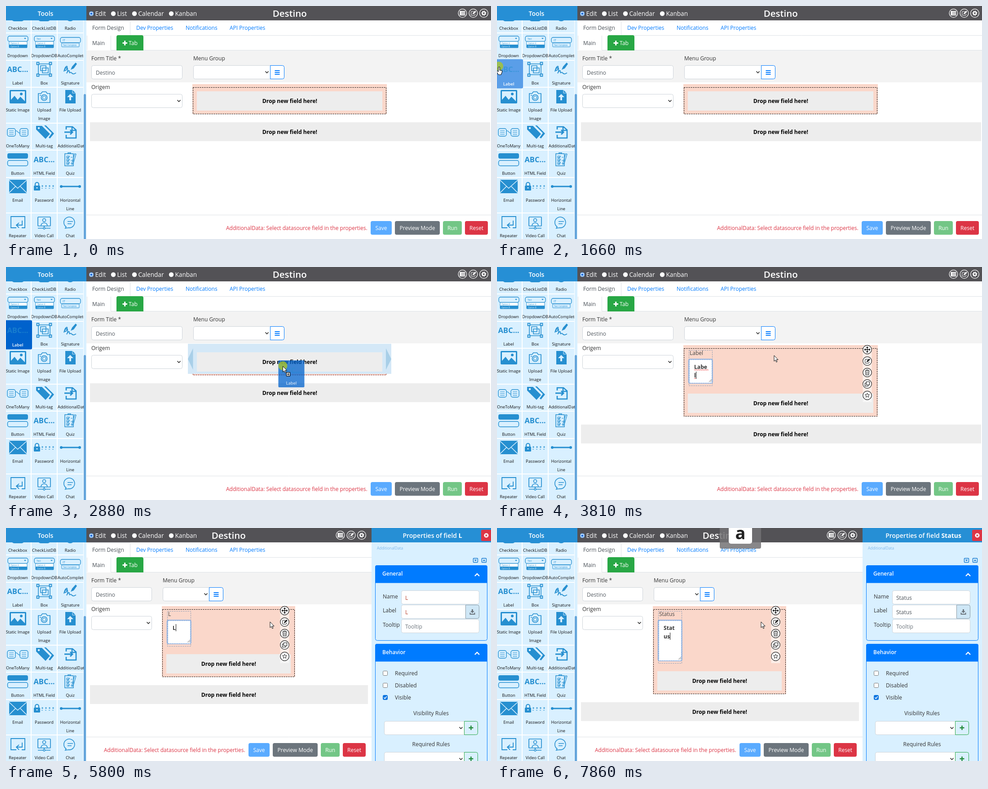
Recreate the animation shown at these times as an HTML page with a canvas. Size 1080 by 519 pixels, loop 7.99 s.

```html
<!DOCTYPE html>
<html lang="en">
<head>
<meta charset="utf-8">
<title>Form designer</title>
<style>
html, body { margin: 0; width: 100%; height: 100%; overflow: hidden; background: #fff; }
canvas { display: block; }
</style>
</head>
<body>
<canvas id="stage" width="1080" height="519"></canvas>
<script>
const c = document.getElementById('stage').getContext('2d');
const LOOP = 7990, STEP = 200 / 3;
const BLUE = '#268fd0', PALE = '#d9f0ff', PRIMARY = '#007bff', INK = '#333', LINE = '#dee2e6';
const PINK = '#fad7ca', GREY = '#ededed', GREEN = '#28a745', RED = '#dc3545';

// time, label text, extra height of the text area
const edits = [
  [3810, 'Label', 1], [5340, 'Labe', 0], [5400, 'Labe', 19], [5470, 'Lab', 19],
  [5670, 'La', 19], [5740, 'L', 19], [5800, 'L', 0], [6000, '', -1],
  [6800, 'S', 0], [7260, 'St', 0], [7330, 'Sta', 0], [7400, 'Sta', 19],
  [7590, 'Stat', 19], [7660, 'Statu', 19], [7790, 'Status', 19], [7860, 'Status', 38]
];

const mix = (a, b, p) => a + (b - a) * p;
const clamp = v => Math.max(0, Math.min(1, v));
const ease = v => { v = clamp(v); return v * v * (3 - 2 * v); };
const span = (t, a, b) => ease((t - a) / (b - a));

function text(s, x, y, color = INK, size = 12, weight = 400, align = 'left') {
  c.font = `${weight} ${size}px "Open Sans", sans-serif`;
  c.textAlign = align;
  c.fillStyle = color;
  c.fillText(s, x, y);
}
function rect(x, y, w, h, color) { c.fillStyle = color; c.fillRect(x, y, w, h); }
function box(x, y, w, h, r, fillColor, edge, width = 1) {
  c.beginPath();
  c.roundRect(x, y, w, h, r);
  if (fillColor) { c.fillStyle = fillColor; c.fill(); }
  if (edge) { c.strokeStyle = edge; c.lineWidth = width; c.stroke(); }
}
function disc(x, y, r, fillColor, edge, width = 1) { box(x - r, y - r, 2 * r, 2 * r, r, fillColor, edge, width); }
function fill(d, color) { c.fillStyle = color; c.fill(new Path2D(d)); }
function line(d, color = BLUE, width = 1.5) {
  c.strokeStyle = color;
  c.lineWidth = width;
  c.stroke(new Path2D(d));
}
function at(x, y, draw, alpha = 1) {
  c.save();
  c.translate(x, y);
  c.globalAlpha *= alpha;
  draw();
  c.restore();
}
function dashed(x, y, w, h, color, pattern = [3, 2]) {
  c.save();
  c.setLineDash(pattern);
  box(x, y, w, h, 0, null, color);
  c.restore();
}

// ---- sidebar icons, drawn around their own centre
const star = n => Array.from({ length: 2 * n }, (_, i) => {
  const a = i * Math.PI / n - Math.PI / 2, r = i % 2 ? 2.3 : 5.2;
  return `${i ? 'L' : 'M'}${r * Math.cos(a)} ${r * Math.sin(a)}`;
}).join('') + 'Z';

function dropdown(caption) {
  box(-22, -13, 45, 12, 4, null, BLUE, 1.3);
  fill('M14 -9h5l-2.5 3z', BLUE);
  text(caption, -17, -5, BLUE, 5);
  box(-19, -1, 40, 14, 1, '#fff', BLUE);
  rect(-19, 6, 40, 7, BLUE);
  text('Option A', -16, 5, BLUE, 4.5);
  text('Option B', -16, 11.5, PALE, 4.5);
}
function abc() { text('ABC...', 0, 6, BLUE, 16.5, 700, 'center'); }
function pencil(s = 1, color = BLUE) {
  c.save();
  c.scale(s, s);
  line('M2 -5H-4Q-6 -5 -6 -3V4Q-6 6 -4 6H3Q5 6 5 4V2', color, 1.3);
  fill('M-2 3L-1 -1L5 -7L8 -4L2 2Z', color);
  c.restore();
}

const icons = {
  Checkbox() { box(-13, -2, 27, 10, 5, BLUE); },
  CheckListDB() { box(-13, -2, 26, 10, 5, BLUE); },
  Radio() { disc(0, -2, 10, BLUE); },
  Dropdown() { dropdown(''); },
  DropdownDB() { dropdown('Text'); },
  AutoComplete() {
    box(-22, -10, 45, 12, 4, null, BLUE, 1.3);
    text('IT', -17, -1, BLUE, 7);
    box(-19, 2, 39, 9, 1, null, BLUE);
    text('Text Complete', -16, 8.5, BLUE, 4.5);
  },
  Label: abc,
  Box() {
    line('M-13 -12H13V12H-13ZM-8 -8H4V3H-8ZM-4 -3H9V8H-4Z', BLUE, 1.6);
    for (const x of [-14, 14]) for (const y of [-13, 13]) box(x - 2.5, y - 2.5, 5, 5, 0, PALE, BLUE, 1.8);
  },
  Signature() {
    line('M-14 5C-11 -9 -5 -9 -7 -3C-9 5 -15 4 -11 -2C-4 -9 -5 5 -8 9C-5 3 -1 0 -2 7C0 10 0 4 3 8C7 12 9 10 13 8', BLUE, 1.8);
    fill('M1 1L4 -6L12 -15L15 -12L8 -2Z', BLUE);
  },
  'Static Image'() {
    box(-18, -15, 37, 30, 2, BLUE);
    rect(-15, -12, 31, 24, PALE);
    fill('M-15 12V7L-7 -2L0 7L6 0L16 10V12Z', BLUE);
    disc(8, -6, 3, BLUE);
  },
  'Upload Image'() {
    line('M-13 -7H-7L-4 -11H4L7 -7H13V13H-13Z', BLUE, 1.7);
    disc(0, 2, 6.5, null, BLUE, 1.7);
    disc(0, 2, 3.5, null, BLUE, 1.2);
    line('M-10 -3h3', BLUE);
  },
  'File Upload'() {
    fill('M-11 -15H5L12 -8V15H-11Z', BLUE);
    fill('M0 -6L7 1H2V8H-2V1H-7Z', PALE);
    line('M5 -15V-8H12', PALE, 1);
  },
  OneToMany() {
    for (const x of [-23, 5]) {
      box(x, -8, 18, 17, 4, null, BLUE, 1.4);
      line(`M${x + 4} -3h10m-10 4h10m-10 4h10`, BLUE, 1);
    }
    line('M-5 -3C1 -4 0 3 5 2', BLUE, 1.3);
  },
  'Multi-tag'() {
    fill('M-10 -15H0L17 2L10 12L13 14L22 3L4 -15Z', BLUE);
    fill('M-18 -14H-5L13 4L3 15L-18 -6Z', BLUE);
    disc(-12, -9, 2.3, PALE);
  },
  AdditionalData() {
    line('M-9 -6V-12H5L13 -5V13H-9V6M4 -12V-4H13', BLUE, 2.6);
    line('M-13 0H4M0 -5L5 0L0 5', BLUE, 3);
  },
  Button() {
    box(-23, -14, 46, 12, 4, BLUE);
    box(-22.5, 2, 45, 12, 4, PALE, BLUE, 1.5);
  },
  'HTML Field': abc,
  Quiz() {
    line('M-12 -13H7V14H-12ZM-5 -13V-15H1V-13', BLUE, 1.5);
    for (const y of [-8, -1, 6]) {
      box(-8, y, 5, 5, 0, null, BLUE, 1);
      line(`M-7 ${y + 2}l2 2l4 -4M1 ${y + 3}h4`, BLUE, 1.2);
    }
    line('M4 7L10 -13L13 -12L7 8L4 11Z', BLUE, 1.3);
  },
  Email() {
    rect(-19, -15, 39, 30, BLUE);
    line('M-19 -14L0 4L20 -14M-19 14L-5 0M20 14L6 0', PALE, 1.6);
  },
  Password() {
    box(-23, -2, 14, 11, 1.5, BLUE);
    line('M-20 -2V-5A4 4 0 0 1 -12 -5V-2', BLUE, 2.2);
    disc(-16, 3, 1.6, PALE);
    for (let x = -4; x < 24; x += 8) line(`M${x - 2} -1h4m-2 -2v4m-2 3h3`, BLUE, 1.2);
  },
  'Horizontal Line'() {
    line('M-22 0H23', BLUE, 3);
    disc(-20, 0, 3, BLUE);
    disc(21, 0, 3, BLUE);
  },
  Repeater() { line('M-3 11H-15V-14H16V11H9M10 -5V5H-2M3 0L-3 5L3 11', BLUE, 1.8); },
  'Video Call'() {
    box(-14, -13, 28, 20, 1, null, BLUE, 1.7);
    disc(0, -6, 3.5, null, BLUE, 1.6);
    line('M-7 6C-6 -2 6 -2 7 6M0 7V12M-14 12H14', BLUE, 1.7);
    disc(0, 12, 2, PALE, BLUE, 1.3);
  },
  Chat() { line('M-9 9A12 12 0 1 1 -4 11L-11 12ZM-6 -3H6M-6 2H3', BLUE, 1.6); }
};
const centers = [26, 85, 143];
const rows = [
  [32, 59, 26, 53], [61, 120, 80, 114], [122, 180, 141, 175], [182, 260, 202, 235],
  [262, 320, 281, 315], [322, 381, 342, 376], [383, 460, 402, 436], [462, 519, 483, 515]
];

function sidebar(hover, press) {
  rect(0, 0, 179, 519, '#fff');
  Object.keys(icons).forEach((name, i) => {
    const [top, bottom, iconY, textY] = rows[Math.floor(i / 3)], col = i % 3, x = centers[col];
    const left = [0, 57, 115][col], width = [55, 56, 57][col];
    c.save();
    c.beginPath();
    c.rect(left, top, width + 1, bottom - top);
    c.clip();
    rect(left, top, width, bottom - top, PALE);
    at(x, iconY, icons[name]);
    const two = bottom - top > 70 && name.includes(' ') && name !== 'Static Image' && name !== 'File Upload';
    const long = /AutoC|Addit/.test(name);
    (two ? name.split(' ') : [name]).forEach((word, n) =>
      text(word, long ? left : x, textY + n * 19, '#111', 9.3, 400, long ? 'left' : 'center'));
    c.restore();
  });
  if (hover) {
    c.globalAlpha = hover;
    const shade = [[90, 0], [158, 98], [232, 204]].map(([a, b]) => Math.round(mix(a, b, press)));
    box(-3, 118.5, 61, 65, 3, `rgb(${shade})`);
    at(26, 141, abc, 0.6);
    text('Label', 26, 177, '#fff', 9.5, 600, 'center');
    c.globalAlpha = 1;
  }
  rect(173, 32, 6, 487, PALE);
  box(173, 196, 5, 330, 2.5, '#65a6db');
  rect(0, 0, 179, 32, '#268fd5');
  text('Tools', 88, 22, '#fff', 14, 600, 'center');
}

// ---- form controls
function chevron(x, y) { line(`M${x - 3.5} ${y - 2}l3.5 3.5l3.5 -3.5`, '#333', 1.7); }
function select(x, y, right, r = 4) {
  box(x + .5, y + .5, right - x - 1, 30, r, '#fff', '#ced4da');
  chevron(right - 8, y + 15.5);
}
function dropArea(x, y, right, h, mid) {
  rect(x, y, right - x, h, GREY);
  text('Drop new field here!', mid, y + 26, '#000', 12.15, 700, 'center');
}
function button(label, x, w, color) {
  box(x, 479, w, 30.5, 4, color);
  text(label, x + w / 2, 499, '#fff', 12.05, 400, 'center');
}

const toolIcons = [
  () => line('M-6 0H6M0 -6V6M-4 -2L-6 0L-4 2M4 -2L6 0L4 2M-2 -4L0 -6L2 -4M-2 4L0 6L2 4', '#111', 1.4),
  () => pencil(.8, '#222'),
  () => line('M-5 -4H5M-2 -4V-6H2V-4M-4 -4L-3.5 5.5H3.5L4 -4M-1.5 -2V4M1.5 -2V4', '#222', 1),
  () => line('M-2 -5H5V2H-2ZM-2 -2H-5V5H2V2', '#222', 1.2),
  () => line(star(5), '#222', 1)
];

function labelField(x, label, extra, toolX) {
  const bottom = 257 + extra;
  dashed(x + .5, 185.5, 52, bottom + 6 - 185, '#8d9db5', [3, 2]);
  text(label, x + 2, 196, '#444');
  box(x, 205.5, 52.5, bottom - 205, 3, null, 'rgba(110,170,240,.55)', 3);
  box(x + 1, 206.5, 51, bottom - 206, 2, '#fff');
  dashed(x + 1.5, 206.5, 50, bottom - 206, '#5b92d8', [2, 2]);
  line(`M${x + 45} ${bottom - 2}l6 -6m-3 6l3 -3`, '#777', 1);
  const lines = [label.slice(0, 4), label.slice(4)].filter((s, i) => s || !i);
  lines.forEach((s, i) => {
    text(s, x + 12, 227 + 19 * i, '#333', 12.1, 700);
    if (label === 'Label') {
      let wave = `M${x + 12} ${230 + 19 * i}`;
      for (let n = 0; n < c.measureText(s).width / 4; n++) wave += 'l2 -1.5l2 1.5';
      line(wave, '#e33', .9);
    }
  });
  const end = x + 12.5 + c.measureText(lines[lines.length - 1]).width;
  rect(Math.round(end), 195 + 19 * lines.length, 1, 16, '#111');
  rect(toolX - 10, 176, 20, 125, 'rgba(255,255,255,.55)');
  toolIcons.forEach((draw, i) => at(toolX, 184 + 25.5 * i, () => { disc(0, 0, 9.7, '#fff', '#222', 1.2); draw(); }));
}

function mainArea(p, field, over) {
  const s = n => n * p, mid = 631.8 - s(136);
  rect(179, 0, 901, 519, '#fff');
  rect(179, 0, 901, 32, '#535256');
  [['Edit', 190], ['List', 239], ['Calendar', 286], ['Kanban', 368]].forEach(([name, x], i) => {
    disc(x, 17, 5.2, '#fff');
    if (!i) {
      disc(x, 17, 4.6, null, '#0a6fe0', 1);
      disc(x, 17, 2.6, '#0a6fe0');
    }
    text(name, x + 8.5, 22, '#fff', 13.6);
  });
  text('Destino', mid, 24, '#fff', 20.5, 600, 'center');
  [1016.5, 1040.5, 1064].forEach((x, i) => at(x - s(272), 16, () => {
    disc(0, 0, 9.4, null, '#fff', 1.3);
    if (i === 0) { rect(-6, -5, 12, 10, '#fff'); line('M-3 -2.5h9M-3 0h9M-3 2.5h9', '#535256', .8); }
    if (i === 1) pencil(.8, '#fff');
    if (i === 2) {
      c.save(); c.setLineDash([2.2, 1.9]); disc(0, 0, 4.6, null, '#fff', 2); c.restore();
      disc(0, 0, 3, null, '#fff', 2.2);
    }
  }));

  line('M276.5 65.5V33H179M276.5 65.5H1080', LINE, 1);
  text('Form Design', 192, 53, '#495057');
  [['Dev Properties', 290], ['Notifications', 400], ['API Properties', 498]].forEach(([name, x]) => text(name, x, 53, PRIMARY));
  rect(179, 99, 901, 71, '#f3f3f3');
  line('M180.5 98V66M233.5 66V98.5H1080', LINE, 1);
  text('Main', 192, 87, '#495057');
  box(246, 65, 60, 34, [4, 4, 0, 0], GREEN);
  line('M259.5 82.5H270M264.7 77.3V87.7', '#fff', 3);
  text('Tab', 273, 87, '#fff', 12.2);

  const half = 393 - s(68), menu = 417 - s(68), menuEnd = 588 - s(136);
  text('Form Title *', 190, 121);
  box(190.5, 132.5, half - 191, 30, 4, '#fff', '#ced4da');
  text('Destino', 200, 153, '#555c63');
  text('Menu Group', menu, 121);
  select(menu, 132, menuEnd + 1, [4, 0, 0, 4]);
  box(menuEnd + .5, 132.5, 31, 30, [0, 4, 4, 0], '#fff', PRIMARY);
  line(`M${menuEnd + 10.5} 144h11m-11 4h11m-11 4h11`, PRIMARY, 1.8);
  text('Origem', 190, 185);
  select(190, 196, half);

  const left = 415 - s(68), right = 848 - s(204);
  const extra = field ? field[2] : 0, areaY = field ? 281 + extra : 190;
  rect(left, 174, right - left, areaY - 174 + 51, PINK);
  dashed(left + 1.5, 181.5, right - left - 3, areaY + 50 - 181, over ? '#7c2020' : '#111');
  if (over) {
    rect(405, 171, 453, 67, '#d4e8f7');
    fill('M416.5 181V229L405 205ZM846 181V229L858 205Z', '#a8cfe8');
  }
  dropArea(left + 10, areaY, right - 10, 43, mid);
  if (field) labelField(left + 12, field[1], extra, right - 23.5);
  dropArea(187, field ? 350 + extra : 259, 1078 - s(272), 42, mid);

  line('M179 465.5H1080', LINE, 1);
  at(-s(272), 0, () => {
    text('AdditionalData: Select datasource field in the properties.', 490, 499, RED);
    button('Save', 812, 47, '#5aabff');
    button('Preview Mode', 866, 100, '#6c757d');
    button('Run', 973, 42, '#73c686');
    button('Reset', 1022, 51, RED);
  });
}

function card(title, y, h) {
  box(822.5, y + .5, 249, h, 4, PALE, PRIMARY);
  box(822, y, 250, 39.5, [4, 4, 0, 0], PRIMARY);
  text(title, 838, y + 23, '#fff', 12, 600);
  line(`M1044 ${y + 24}l5 -5l5 5`, '#fff', 2.4);
}

function panel(p, label, warn) {
  at(272 * (1 - p), 0, () => {
    rect(814, 0, 272, 519, PALE);
    rect(814, 0, 272, 32, '#268fd5');
    const lead = 'Properties of field ';
    c.font = '600 14px "Open Sans", sans-serif';
    const leadWidth = c.measureText(lead).width;
    c.font = '700 14px "Open Sans", sans-serif';
    const x = 949.5 - (leadWidth + c.measureText(label).width) / 2;
    text(lead, x, 22, '#fff', 14, 600);
    text(label, x + leadWidth, 22, '#fff', 14, 700);
    box(1058, 4, 28, 25, 3, RED);
    disc(1069.5, 16.5, 5, '#fff');
    line('M1067.5 14.5l4 4m0 -4l-4 4', RED, 1.5);
    text('AdditionalData', 826, 48, '#7db7ea', 8.4);
    for (const [bx, d] of [[1040, -1], [1059, 1]]) {
      box(bx + .5, 67.5, 10, 9, 1, null, '#1479d0', 1.4);
      fill(`M${bx + 2.5} ${72 + d * 1.5}h6l-3 ${-d * 3.5}z`, '#1479d0');
    }

    card('General', 83, 167);
    const tone = warn ? '#b8402c' : '#495057';
    [['Name', 140, label, tone], ['Label', 172, label, tone], ['Tooltip', 204, 'Tooltip', '#6c757d']].forEach(([name, y, value, color], i) => {
      text(name, 839, y + 17 - (i ? 1 : 0));
      box(880.5, y - .5, 173, 30, 4, '#fff', '#ced4da');
      text(value, 889, y + 20, color);
    });
    box(1023.5, 171.5, 30, 30, [0, 4, 4, 0], '#cfe7f6', '#8a9aa5');
    fill('M1037 181h3v4h3l-4.5 4.5l-4.5 -4.5h3z', '#6c757d');
    line('M1033.5 188.5v3.5h10v-3.5', '#6c757d', 2);

    card('Behavior', 258, 280);
    ['Required', 'Disabled', 'Visible'].forEach((name, i) => {
      const y = 323.5 + 27 * i;
      box(839.5, y - 5, 10, 10, 2, i === 2 ? '#0b75e0' : '#fff', i === 2 ? '#0b75e0' : '#767676');
      if (i === 2) line(`M841.5 ${y}l2.3 2.5l4 -5`, '#fff', 1.6);
      text(name, 866, y + 4.5);
    });
    [['Visibility Rules', 417], ['Required Rules', 486]].forEach(([name, y]) => {
      text(name, 946.5, y, INK, 12, 400, 'center');
      select(842, y + 13, 1021, [4, 0, 0, 4]);
      box(1020.5, y + 13.5, 30, 30, [0, 4, 4, 0], PALE, GREEN);
      line(`M1030.5 ${y + 28}h10m-5 -5v10`, '#218838', 2.4);
    });
  });
}

// ---- pointer
function pointer(t) {
  if (t < 65) return null;
  if (t < 130) return [1006, 507];
  if (t < 1060) {
    const p = span(t, 270, 1060);
    return [mix(979, 42, p), mix(497, 108, p)];
  }
  if (t < 1930) {
    const p = span(t, 1060, 1560);
    return [mix(42, 4, p), mix(108, 135, p)];
  }
  if (t < 2760) {
    const p = span(t, 1920, 2850), q = 1 - p;
    return [q * q * 4 + 2 * p * q * 330 + p * p * 610, q * q * 135 + 2 * p * q * 375 + p * p * 246];
  }
  if (t < 3800) {
    const a = span(t, 2740, 2880), b = span(t, 2880, 3150);
    return [mix(596, 617, a), mix(256, 220, a) - 23 * b];
  }
  const p = span(t, 3800, 4540);
  return [mix(617, 588, p), mix(197, 209, p)];
}

function drawPointer(t, q) {
  const pos = pointer(q);
  if (!pos) return;
  const drag = t >= 1990 && t < 3610, pressed = t >= 1590 && t < 3610;
  if (drag) at(pos[0] - 10, pos[1] - 13, () => {
    box(0, 0, 58, 60, 2, '#0062cc');
    at(29, 22, abc, .6);
    text('Label', 29, 54, '#fff', 9.2, 600, 'center');
  }, .75);
  at(pos[0], pos[1], () => {
    if (pressed) disc(0, -1, 10, 'rgba(176,200,32,.75)');
    if (t >= 1130 && t < 1990) {
      const hand = 'M-1 2Q1 -1 2 2V8L7 9Q8 10 7 13L5 18H-1L-5 11Q-4 9 -1 11Z';
      fill(hand, '#fff');
      line(hand, '#111', 1.1);
    } else {
      const arrow = 'M0 0V13L3 10.2L5 15L7 14L5 9.5H9Z';
      fill(arrow, '#fff');
      line(arrow, '#111', 1);
    }
    if (drag) {
      box(8, 14, 8, 8, 0, '#fff', '#111', 1.2);
      line('M9.5 18h5m-2.5 -2.5v5', '#111', 1.4);
    }
  });
}

function keyCap() {
  box(496, -6, 92, 52, 4, 'rgba(116,115,117,.85)');
  box(516, -6, 52, 41, 5, '#fff');
  text('a', 542, 25, '#222', 38, 700, 'center');
}

function draw(t) {
  const q = Math.floor((t + 6) / STEP) * STEP;
  const field = edits.filter(e => t >= e[0]).pop();
  const open = span(q, 3860, 4460);
  mainArea(open, field, t >= 2810 && t < 3810);
  sidebar(t < 3810 ? span(q, 1060, 1330) : 0, span(q, 1660, 1930));
  if (field) panel(open, field[1], t < 6000);
  drawPointer(t, q);
  if (t >= 6330) keyCap();
}

const start = performance.now();
function tick() {
  draw((performance.now() - start) % LOOP);
  requestAnimationFrame(tick);
}
tick();
</script>
</body>
</html>
```
